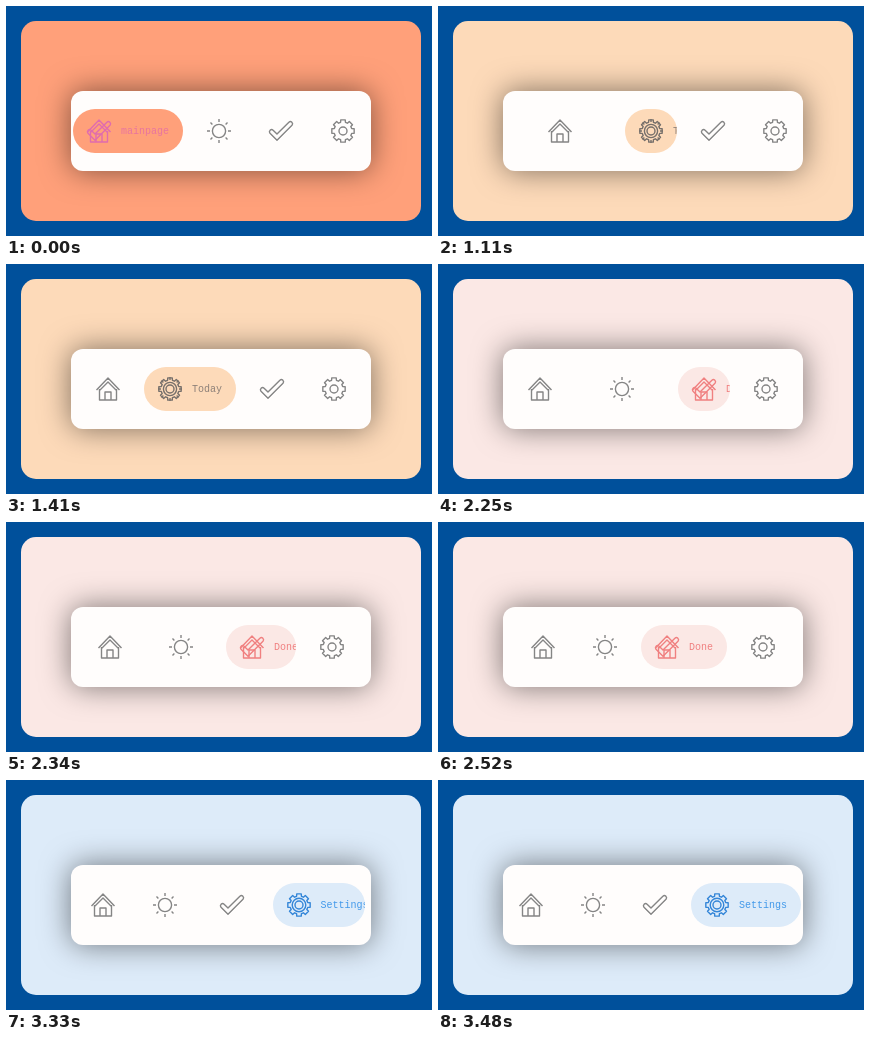
These frames come from a looping animation (426x230 px, 4.29 s). An HTML page:

```html
<!DOCTYPE html>
<html lang="en">
<head>
<meta charset="utf-8">
<title>Tab bar</title>
<style>
  html, body { margin: 0; width: 100%; height: 100%; overflow: hidden; background: #00509b; }

  .card {
    --c: #ffa07a;
    position: absolute; left: 15px; top: 15px; width: 400px; height: 200px;
    border-radius: 15px; background: var(--c);
    animation: card 4290ms step-end infinite;
  }
  .bar {
    position: absolute; left: 50px; top: 70px; width: 300px; height: 80px;
    margin: 0; padding: 0; list-style: none; border-radius: 12px;
    display: flex; gap: 10px; align-items: center; justify-content: center;
    background: #fffdfc; box-shadow: 0 0 30px rgba(0, 0, 0, .5);
  }
  .tab {
    --on: 0;
    position: relative; flex: none; width: 52px; height: 44px;
    border-radius: 22px; overflow: hidden;
    animation: var(--w) 4290ms ease infinite, var(--s) 4290ms step-end infinite;
  }
  .home  { --w: home-w;  --s: home-on;  --ink: #e8749f; }
  .today { --w: today-w; --s: today-on; --ink: #8d8078; }
  .done  { --w: done-w;  --s: done-on;  --ink: #f08080; }
  .prefs { --w: prefs-w; --s: prefs-on; --ink: #4299ea; }

  svg {
    flex: none; width: 24px; height: 24px; overflow: visible;
    fill: none; stroke: currentColor; stroke-width: 1.4; stroke-linejoin: round;
  }
  .idle {
    position: absolute; left: 50%; top: 10px; margin-left: -12px;
    color: #858585; opacity: calc(1 - var(--on));
  }
  .live {
    position: absolute; inset: 0; padding-left: 14px;
    display: flex; gap: 10px; align-items: center;
    font: 10px "Liberation Mono", monospace; white-space: nowrap;
    color: var(--ink); background: var(--c); opacity: var(--on);
  }
  .home .live svg { color: #e06cae; }
  .today .live svg { color: #77706b; }
  .prefs .live svg { color: #3486d8; }

  @keyframes card {
    0% { --c: #ffa07a; }
    25.874% { --c: #fddab9; }
    52.448% { --c: #fbe8e5; }
    74.825%, 100% { --c: #ddebf9; }
  }

  @keyframes home-w  { 0%, 25.874% { width: 110px; } 32.634%, 100% { width: 52px; } }
  @keyframes today-w { 0%, 25.874% { width: 52px; } 32.634%, 52.448% { width: 92px; } 59.208%, 100% { width: 52px; } }
  @keyframes done-w  { 0%, 52.448% { width: 52px; } 59.208%, 74.825% { width: 86px; } 81.585%, 100% { width: 52px; } }
  @keyframes prefs-w { 0%, 74.825% { width: 52px; } 81.585%, 100% { width: 110px; } }

  @keyframes home-on  { 0% { --on: 1; } 25.874%, 100% { --on: 0; } }
  @keyframes today-on { 0% { --on: 0; } 25.874% { --on: 1; } 52.448%, 100% { --on: 0; } }
  @keyframes done-on  { 0% { --on: 0; } 52.448% { --on: 1; } 74.825%, 100% { --on: 0; } }
  @keyframes prefs-on { 0% { --on: 0; } 74.825%, 100% { --on: 1; } }
</style>
</head>
<body>
<svg style="position:absolute;width:0;height:0">
  <defs>
    <g id="house">
      <path d="M-11.5 1L0 -11L11.5 1M-8.5 1.5L0 -7L8.5 1.5M-8.5 0V11H8.5V0M-3 11V3H3V11"/>
    </g>
    <g id="sun">
      <circle r="6.6"/>
      <path d="M0 -12V-9M0 12V9M-12 0H-9M12 0H9M-8.5 -8.5L-6.6 -6.6M8.5 -8.5L6.6 -6.6M-8.5 8.5L-6.6 6.6M8.5 8.5L6.6 6.6"/>
    </g>
    <g id="check">
      <path d="M-11 2.3L-4 9.3L11 -5.7A2.2 2.2 0 0 0 7.9 -8.8L-4 3.1L-7.9 -.8A2.2 2.2 0 0 0 -11 2.3Z"/>
    </g>
    <g id="gear">
      <path id="teeth"/>
      <circle r="4"/>
    </g>
  </defs>
</svg>

<div class="card">
  <ul class="bar">
    <li class="tab home">
      <svg class="idle" viewBox="-12 -12 24 24"><use href="#house"/></svg>
      <div class="live">
        <svg viewBox="-12 -12 24 24"><use href="#house"/><use href="#check"/></svg>
        <span>mainpage</span>
      </div>
    </li>
    <li class="tab today">
      <svg class="idle" viewBox="-12 -12 24 24"><use href="#sun"/></svg>
      <div class="live">
        <svg viewBox="-12 -12 24 24"><use href="#gear"/><use href="#sun"/></svg>
        <span>Today</span>
      </div>
    </li>
    <li class="tab done">
      <svg class="idle" viewBox="-12 -12 24 24"><use href="#check"/></svg>
      <div class="live">
        <svg viewBox="-12 -12 24 24"><use href="#house"/><use href="#check"/></svg>
        <span>Done</span>
      </div>
    </li>
    <li class="tab prefs">
      <svg class="idle" viewBox="-12 -12 24 24"><use href="#gear"/></svg>
      <div class="live">
        <svg viewBox="-12 -12 24 24"><use href="#gear"/><circle r="6.8"/></svg>
        <span>Settings</span>
      </div>
    </li>
  </ul>
</div>

<script>
  // Eight teeth, each from root to tip and back.
  const tooth = [[-.27, 9], [-.2, 11.4], [.2, 11.4], [.27, 9]];
  const points = [];
  for (let i = 0; i < 8; i++) {
    for (const [da, r] of tooth) {
      const a = i * Math.PI / 4 + da;
      points.push((r * Math.cos(a)).toFixed(2) + ' ' + (r * Math.sin(a)).toFixed(2));
    }
  }
  document.getElementById('teeth').setAttribute('d', 'M' + points.join('L') + 'Z');
</script>
</body>
</html>
```
